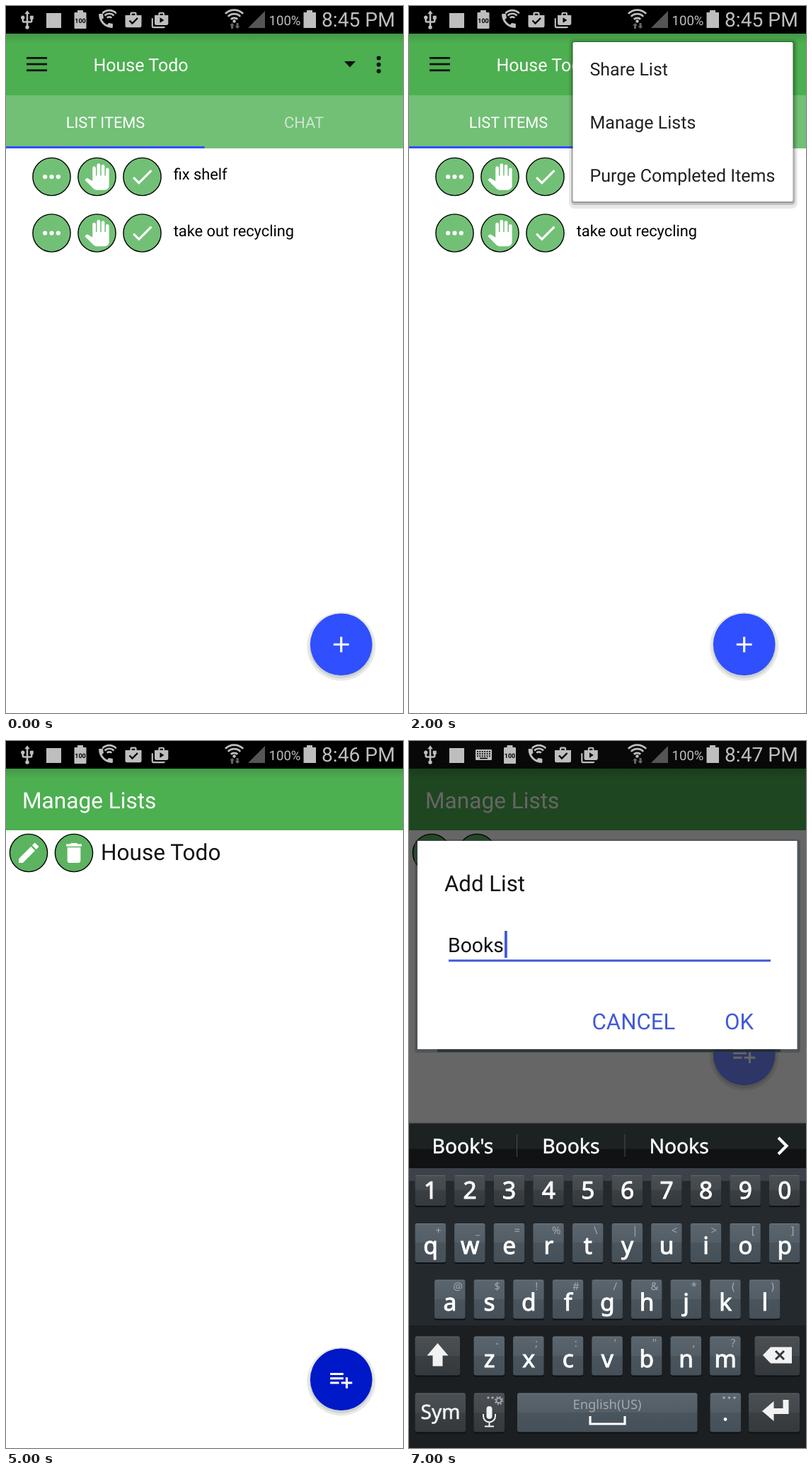
These frames come from a looping animation (561 px wide and 998 px high, 8000 ms). An HTML page:

```html
<!DOCTYPE html>
<html lang="en">
<head>
<meta charset="utf-8">
<title>Todo list demo</title>
<style>
  html, body { margin: 0; width: 100%; height: 100%; overflow: hidden; background: #fff; }
  svg { display: block; width: 100%; height: 100%; }
  text { font-family: Roboto, sans-serif; text-rendering: geometricPrecision; white-space: pre; }
  .kb text { font-family: "Noto Sans", "Open Sans", sans-serif; }
  .kb .label { stroke: #fff; stroke-width: 1; }
  .kb .word { stroke: #fff; stroke-width: .5; }
</style>
</head>
<body>
<svg id="stage" viewBox="0 0 561 998"></svg>
<script>
const STEP = 1000, STEPS = 8;
const GREEN = '#4caf50', BLUE = '#304ffe', ACCENT = '#4059d8', GREY = '#bebebe', HINT = '#a3a9ae';

const ICON = {
  hand: 'M23 5.5V20c0 2.2-1.8 4-4 4h-7.3c-1.08 0-2.1-.43-2.85-1.19L1 14.83s1.26-1.23 1.3-1.25c.22-.19.49-.29.79-.29.22 0 .42.06.6.16.04.01 4.31 2.46 4.31 2.46V4c0-.83.67-1.5 1.5-1.5S11 3.17 11 4v7h1V1.5c0-.83.67-1.5 1.5-1.5S15 .67 15 1.5V11h1V2.5c0-.83.67-1.5 1.5-1.5s1.5.67 1.5 1.5V11h1V5.5c0-.83.67-1.5 1.5-1.5s1.5.67 1.5 1.5z',
  done: 'M9 16.2L4.8 12l-1.4 1.4L9 19 21 7l-1.4-1.4z',
  more: 'M4 12a2 2 0 1 0 4 0a2 2 0 1 0-4 0zm6 0a2 2 0 1 0 4 0a2 2 0 1 0-4 0zm6 0a2 2 0 1 0 4 0a2 2 0 1 0-4 0z',
  edit: 'M3 17.25V21h3.75L17.81 9.94l-3.75-3.75zM20.71 7.04c.39-.39.39-1.02 0-1.41l-2.34-2.34c-.39-.39-1.02-.39-1.41 0l-1.83 1.83 3.75 3.75z',
  bin: 'M6 19c0 1.1.9 2 2 2h8c1.1 0 2-.9 2-2V7H6zM19 4h-3.5l-1-1h-5l-1 1H5v2h14z',
  plus: 'M5 11h6V5h2v6h6v2h-6v6h-2v-6H5z',
  addList: 'M14 10H2v2h12zm0-4H2v2h12zm4 8v-4h-2v4h-4v2h4v4h2v-4h4v-2zM2 16h8v-2H2z',
  usb: 'M15 7v4h1v2h-3V5h2l-3-4-3 4h2v8H8v-2.07c.7-.37 1.2-1.08 1.2-1.93 0-1.21-.99-2.2-2.2-2.2S4.8 7.79 4.8 9c0 .85.5 1.56 1.2 1.93V13c0 1.11.89 2 2 2h3v3.05c-.71.37-1.2 1.1-1.2 1.95a2.2 2.2 0 0 0 4.4 0c0-.85-.49-1.58-1.2-1.95V15h3c1.11 0 2-.89 2-2v-2h1V7z',
  call: 'M20 15.4c-1.2 0-2.4-.2-3.5-.6-.35-.1-.75 0-1 .25L13.9 17c-2.8-1.3-5.5-3.9-6.9-6.8l1.95-1.7c.27-.3.35-.7.24-1C8.8 6.4 8.6 5.2 8.6 4c0-.5-.4-1-1-1H4.2C3.6 3 3 3.2 3 4c0 9.3 7.7 17 17 17 .7 0 1-.6 1-1.2v-3.4c0-.6-.4-1-1-1z',
  bag: 'M16 6V4q0-2-2-2h-4q-2 0-2 2v2H2v13q0 2 2 2h16q2 0 2-2V6zM10 4h4v2h-4z',
  bags: 'M3 9H1v11q0 2 2 2h14q2 0 2-2H3zM18 5V3q0-2-2-2h-4q-2 0-2 2v2H5v11q0 2 2 2h14q2 0 2-2V5zM12 3h4v2h-4zM12 15V8l5.5 3.500z'
};

const rect = (x, y, w, h, fill, more = '') =>
  `<rect x="${x}" y="${y}" width="${w}" height="${h}" fill="${fill}" ${more}/>`;
const disc = (x, y, r, fill, more = '') => `<circle cx="${x}" cy="${y}" r="${r}" fill="${fill}" ${more}/>`;
const path = (d, fill, more = '') => `<path d="${d}" fill="${fill}" ${more}/>`;
const line = (d, color, w) => path(d, 'none', `stroke="${color}" stroke-width="${w}"`);
const text = (s, x, y, size, fill = '#111', more = '') =>
  `<text x="${x}" y="${y}" font-size="${size}" fill="${fill}" ${more}>${s.replace(/&/g, '&amp;').replace(/</g, '&lt;')}</text>`;
const mid = (s, x, y, size, fill, more = '') => text(s, x, y, size, fill, 'text-anchor="middle" ' + more);
const move = (x, y, body) => `<g transform="translate(${x} ${y})">${body}</g>`;
// Shows its content only during the listed steps
const on = (steps, body) => `<g data-on="${steps}">${body}</g>`;
const icon = (name, cx, cy, fill = '#fff', k = 1.558) =>
  path(ICON[name], fill, `fill-rule="evenodd" transform="translate(${cx - 12 * k} ${cy - 12 * k}) scale(${k})"`);
const badge = (name, cx, cy, fill) =>
  disc(cx, cy, 26.6, fill, 'stroke="#000" stroke-width="1.4"') + icon(name, cx, cy);

const fab = (cy, fill, name) =>
  disc(473.7, cy + 3, 48.5, '#e7eae7') + disc(473.7, cy + 3, 45, '#cfd3d0') +
  disc(473.7, cy + 0.3, 43.8, fill) + icon(name, 473.7, cy + 0.3);

function fan(cx, cy, radii, w) {
  return radii.map(r => {
    const d = r * 0.72;
    return line(`M${cx - d} ${cy - d}A${r} ${r} 0 0 1 ${cx + d} ${cy - d}`, GREY, w);
  }).join('');
}

function notices() {
  return rect(101, 6, 8, 4, GREY) + rect(96.5, 9, 17, 23, GREY, 'rx="1"') +
    mid('100', 105, 23.5, 9, '#000', 'font-weight="700"') +
    icon('call', 141, 21, GREY, 1.1) + fan(146, 20, [4.5, 9, 13.5], 2.6) +
    icon('bag', 180, 20, GREY, 1.15) + line('M174.500 20.500l4 4 7.500-7.500', '#000', 2.4) +
    icon('bags', 217.5, 20.5, GREY, 1.07);
}

function keyboardIcon() {
  let s = rect(94, 12, 23, 15, GREY, 'rx="1"');
  for (let r = 0; r < 3; r++)
    for (let c = 0; c < 6; c++) s += rect(96 + c * 3.4, 14 + r * 3.2, 1.8, 1.8, '#000');
  return s + rect(100, 23.6, 11, 1.6, '#000');
}

function statusBar() {
  return rect(0, 0, 561, 39, '#000') + on('67', rect(0, 0, 561, 39, '#080808')) +
    icon('usb', 30, 20, GREY, 1.25) + rect(57, 10, 21, 21, GREY) +
    on('012345', notices()) + on('67', keyboardIcon() + move(37.5, 0, notices())) +
    fan(322.5, 23.5, [6.5, 12, 17.5], 2.8) + disc(322.5, 21.5, 2.2, GREY) +
    path('M319.500 24l3.500 3.500h-2v4.500h-3v-4.500h-2zM327 32l-3.500-3.500h2v-4.500h3v4.500h2z', '#666') +
    path('M342 31h24V7z', '#555') + text('100%', 371.5, 27, 18.6, GREY) +
    rect(425, 6, 8, 4, GREY) + rect(420.5, 9, 17.5, 22, GREY) +
    [['01234', '8:45 PM'], ['56', '8:46 PM'], ['7', '8:47 PM']]
      .map(([s, t]) => on(s, text(t, 446, 29.2, 28.2, GREY))).join('');
}

const bar = rect(0, 39, 561, 87, GREEN) + rect(0, 39, 561, 14, 'url(#barShade)');

function listScreen() {
  const rows = ['fix shelf', 'take out recycling'].map((label, i) => {
    const y = 241 + i * 79.5;
    return ['more', 'hand', 'done'].map((n, j) => badge(n, 64.5 + j * 64, y, '#72c076')).join('') +
      text(label, 236.7, y + 4, 21.8, '#000');
  }).join('');
  return bar + on('1', disc(526, 82.5, 23.5, '#449d48')) +
    [72, 80.7, 89.4].map(y => rect(29, y, 29, 2.8, '#111')).join('') +
    text('House Todo', 123.5, 92, 25, '#fff') + path('M478 78h16l-8 8.500z', '#111') +
    [73.5, 82.8, 92].map(y => disc(526.7, y, 3, '#111')).join('') +
    rect(0, 126, 561, 75, '#71c075') + rect(0, 198, 280.5, 3, BLUE) +
    mid('LIST ITEMS', 140.5, 172, 21.8, '#fff') + mid('CHAT', 421, 172, 21.8, '#d0e6d1') +
    rows + fab(901, BLUE, 'plus');
}

function menu() {
  return rect(226, 46, 323, 240, '#000', 'rx="8" opacity=".09"') +
    rect(229, 49, 317, 232, '#000', 'rx="5" opacity=".17"') +
    rect(230.5, 50.5, 313, 227.5, '#000', 'rx="3" opacity=".22"') +
    rect(231.5, 51, 311, 225, '#fff', 'rx="2"') +
    on('3', rect(231.5, 126, 311, 75, '#e6e6e6')) +
    ['Share List', 'Manage Lists', 'Purge Completed Items']
      .map((s, i) => text(s, 255.5, 98 + i * 75, 25, '#212121')).join('');
}

function manageScreen() {
  return bar + text('Manage Lists', 23, 94.5, 31.6, '#fff') +
    badge('edit', 32, 158, '#5cb360') + badge('bin', 96, 158, '#5cb360') +
    text('House Todo', 134, 167.5, 31.6, '#111') +
    on('4', fab(901, BLUE, 'addList')) + on('5', fab(901, '#0019c8', 'addList')) +
    on('67', fab(442, '#7088ff', 'addList'));
}

function dialog() {
  return rect(0, 39, 561, 500, '#000', 'opacity=".6"') +
    rect(8, 139, 545, 301, '#33444c', 'rx="4" opacity=".45"') +
    rect(40, 435, 485, 4, '#23292c', 'opacity=".7"') +
    rect(12, 141, 536.5, 294, '#fff') + text('Add List', 50, 212, 31.2) +
    rect(56, 308.5, 455, 3, ACCENT) +
    on('6', text('List name (ex: Grocery Shopping)', 54.7, 298, 28.3, '#737373')) +
    on('7', text('Books', 55, 298, 28.3) + rect(135, 268, 3.8, 38, ACCENT)) +
    text('CANCEL', 258.5, 406.5, 31.2, ACCENT) + text('OK', 446, 406.5, 31.2, ACCENT);
}

const key = (x, y, w, h, tone) =>
  rect(x, y + 2, w, h, '#0d1012', 'rx="3"') + rect(x, y, w, h, `url(#${tone})`, 'rx="3"') +
  rect(x + 1, y, w - 2, 1, '#fff', 'opacity=".14"');

function keyRow(chars, hints, x0, y, h, tone) {
  return [...chars].map((c, i) => {
    const x = x0 + i * 55.6;
    return key(x, y, 43.5, h, tone) +
      mid(c, x + 22, y + (h < 50 ? 33 : 43), 33.5, '#fff', 'class="label"') +
      (hints ? mid(hints[i], x + 33, y + 14.5, 15, HINT) : '');
  }).join('');
}

function keyboard() {
  const suggest = words =>
    words.map((w, i) => mid(w, 76 + i * 152.8, 582, 28.3, '#fff', 'class="word"')).join('');
  let s = rect(0, 539, 561, 459, '#24292d') + rect(0, 539, 561, 37, '#1c2122') +
    rect(0, 576, 561, 27, '#101213') + rect(0, 539, 561, 1.5, '#343c3f') +
    rect(0, 603, 561, 18, '#3c424a') + rect(0, 825, 561, 173, '#1b1f22') +
    rect(152, 555, 1, 32, '#484d50') + rect(304.5, 555, 1, 32, '#484d50') +
    line('M522 560l11.500 11.500-11.500 11.500', '#fff', 4.2) +
    on('6', suggest(['hey', 'I', 'the'])) + on('7', suggest(["Book's", 'Books', 'Nooks']));
  s += keyRow('1234567890', '', 8.5, 613, 43, 'dark') +
    keyRow('qwertyuiop', '+_=%\\|<>[]', 8.5, 681, 55, 'slate') +
    keyRow('asdfghjkl', '@$!#/&*()', 36, 760.5, 55, 'slate') +
    keyRow('zxcvbnm', "-;:'\",?", 91.5, 840.5, 55, 'slate');
  s += key(8.5, 840.5, 63.5, 55, 'dark') + path('M40.500 850l15 17.500h-8v15h-14v-15h-8z', '#f2f2f2') +
    key(488.5, 840.5, 63.5, 55, 'dark') + path('M500 867l11-11.500h30v23h-30z', '#f2f2f2') +
    line('M518 861l12 12m0-12l-12 12', '#33383c', 3);
  s += key(8.5, 920.5, 71.5, 55, 'dark') + mid('Sym', 44.5, 957, 28, '#f2f2f2', 'class="word"') +
    key(91.5, 920.5, 43.5, 55, 'dark') + rect(109.5, 939, 8, 18, '#f2f2f2', 'rx="4"') +
    line('M105 950v3a8.500 8.500 0 0 0 17 0v-3M113.500 961v6M107 967.500h13', '#f2f2f2', 2) +
    disc(112, 927, 1.7, HINT) + disc(118, 927, 1.7, HINT) +
    disc(127, 931, 3.5, 'none', `stroke="${HINT}" stroke-width="2"`) +
    disc(127, 931, 5.4, 'none', `stroke="${HINT}" stroke-width="1.8" stroke-dasharray="2 2.24"`) +
    key(153, 920.5, 254.5, 55, 'slate') + mid('English(US)', 280, 943, 18.4, HINT) +
    line('M256 953v11h49v-11', '#fff', 3.2) +
    key(425.5, 920.5, 43.5, 55, 'slate') + disc(447, 957.5, 2.4, '#fff') +
    [445, 452.5, 460].map(x => disc(x, 927, 1.8, HINT)).join('') +
    key(480, 920.5, 72, 55, 'dark') + path('M536.500 930v20h-21v10l-16.500-14 16.500-14v10h13v-12z', '#f2f2f2');
  return `<g class="kb">${s}</g>`;
}

const fade = (id, ...stops) =>
  `<linearGradient id="${id}" x2="0" y2="1">${stops.map(([o, c, a = 1]) =>
    `<stop offset="${o}" stop-color="${c}" stop-opacity="${a}"/>`).join('')}</linearGradient>`;

const stage = document.getElementById('stage');
stage.innerHTML = '<defs>' +
  fade('barShade', [0, '#000', 0.13], [1, '#000', 0]) +
  fade('dark', [0, '#4a4f54'], [0.5, '#43484d'], [0.5, '#3a3f44'], [1, '#34393d']) +
  fade('slate', [0, '#5b656e'], [0.5, '#535d66'], [0.5, '#4a545c'], [1, '#465058']) +
  '</defs>' + rect(0, 0, 561, 998, '#fff') +
  on('0123', listScreen()) + on('23', menu()) +
  on('4567', manageScreen()) + on('67', dialog() + keyboard()) + statusBar();

const parts = [...stage.querySelectorAll('[data-on]')];
const start = performance.now();
let shown = -1;

function show(step) {
  if (step === shown) return;
  shown = step;
  for (const p of parts) p.style.display = p.dataset.on.includes(step) ? '' : 'none';
}

function tick() {
  show(Math.floor((performance.now() - start) / STEP) % STEPS);
  requestAnimationFrame(tick);
}
show(0);
requestAnimationFrame(tick);
</script>
</body>
</html>
```
